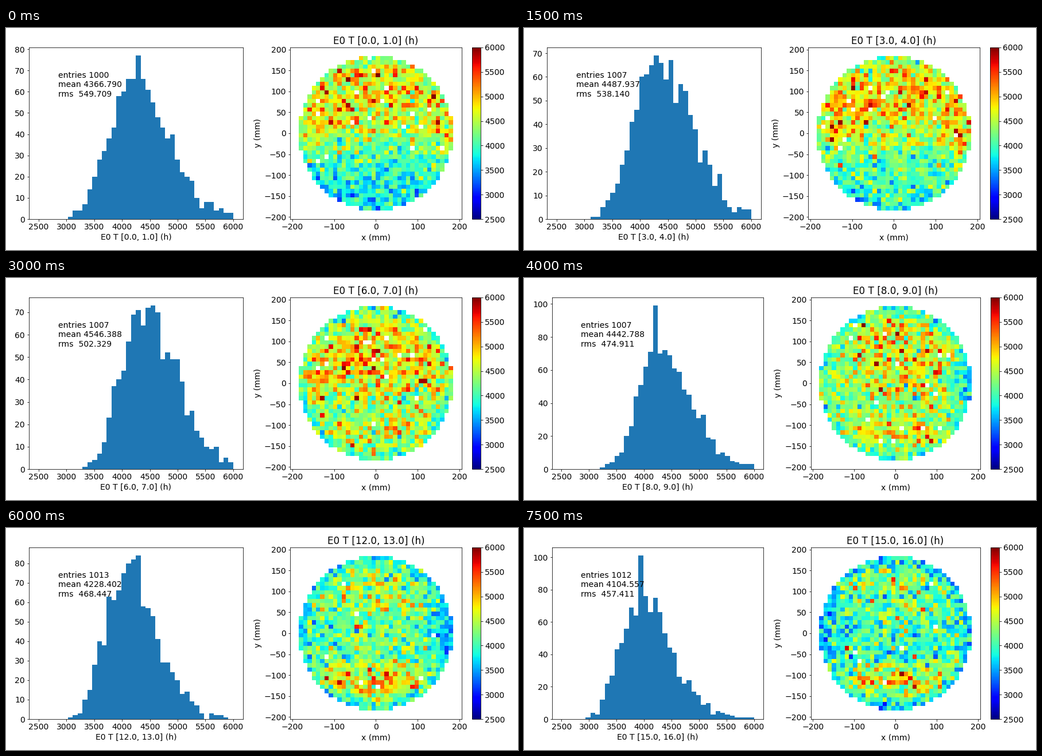
A matplotlib script for the animation above (8 s loop, 892 by 388 pixels).

```python
import numpy as np
import matplotlib.pyplot as plt
from matplotlib.animation import FuncAnimation
from matplotlib.cm import ScalarMappable
from matplotlib.colors import Normalize

W, H, DPI = 892, 388, 64
PX = 72 / DPI  # points per pixel
TOP, BOTTOM = 33.9, 334
LO, HI, BINS = 2500, 6000, 40
STEP = (HI - LO) / BINS
HALF = 205  # half width of the map in mm

plt.rcParams.update({"font.family": "DejaVu Sans", "font.size": 14 * PX,
                     "axes.linewidth": 0.8 * PX, "axes.labelpad": 4 * PX,
                     "axes.titlepad": 6 * PX})
for tick in ("xtick", "ytick"):
    plt.rcParams.update({f"{tick}.major.size": 3.5 * PX, f"{tick}.major.pad": 3.5 * PX,
                         f"{tick}.major.width": 0.8 * PX})

# Statistics at a few hours; the hours between are interpolated.
HOURS = [0, 3, 6, 8, 10, 12, 15]
ENTRIES = [1000, 1007, 1007, 1007, 1005, 1013, 1012]
MEAN = [4366.790, 4487.937, 4546.388, 4442.788, 4318.423, 4228.402, 4104.557]
RMS = [549.709, 538.140, 502.329, 474.911, 464.378, 468.447, 457.411]
PEAK = [77, 69, 73, 99, 87, 84, 101]

# Round detector made of square cells, in units of its radius.
EDGES = np.linspace(-HALF, HALF, BINS + 1)
idx = (np.arange(BINS) - BINS / 2 + 0.5) / 18
U, V = np.meshgrid(idx, idx)
R = np.hypot(U, V)
DISC = R < 1


def stats(hour):
    return [np.interp(hour, HOURS, row) for row in (ENTRIES, MEAN, RMS, PEAK)]


def histogram(hour, rng):
    """Noisy right-skewed (gamma) distribution with a given tallest bar."""
    entries, mean, rms, peak = stats(hour)
    k = 16
    x = LO + STEP * (np.arange(BINS) + 0.5)
    z = np.maximum(k + np.sqrt(k) * (x - mean) / rms, 0.01)
    bars = z ** (k - 1) * np.exp(-z)
    bars *= entries / bars.sum()
    bars = np.maximum(bars + rng.normal(0, 0.7, BINS) * np.sqrt(bars), 0)
    top = bars.argmax()
    bars[top] = 0
    bars = np.minimum(bars * (entries - peak) / bars.sum(), peak)
    bars[top] = peak
    # Round to nearest, but never above the peak.
    return np.minimum(np.round(bars), int(peak)).astype(int)


def blob(u, v, su, sv):
    return np.exp(-((U - u) / su) ** 2 - ((V - v) / sv) ** 2)


def field(hour):
    """Warm upper half fades, a warm band grows below, the sides swing."""
    tilt = 1 / (1 + np.exp(hour - 4))
    rise = np.clip((hour - 3) / 9, 0, 1)
    rise = rise * rise * (3 - 2 * rise)
    centre = np.exp(-((hour - 7) / 2.5) ** 2)
    right = np.cos(2 * np.pi * (hour - 2) / 18)
    left = np.cos(np.pi * (hour - 2) / 13)
    rim = 0.4 + 0.5 * min(hour / 8, 1)
    return (tilt * np.tanh(3 * (V + 0.15))
            + 1.6 * rise * blob(0, -0.62, 0.9, 0.17)
            + 0.5 * blob(0, 0.5, 0.9, 0.3)
            + 0.8 * centre * blob(0, 0.2, 0.6, 0.35)
            + 1.4 * right * blob(0.88, 0, 0.25, 0.4)
            + 0.7 * left * blob(-0.75, 0.12, 0.35, 0.3)
            - rim * np.clip((R - 0.85) / 0.12, 0, 1))


def heatmap(hour, counts, rng):
    """Spread the histogrammed values over the disc, ranked by the field."""
    values = np.repeat(LO + STEP * np.arange(BINS), counts)
    values = np.sort(values + rng.uniform(0, STEP, values.size))
    base = field(hour)[DISC]
    score = base + rng.normal(0, 0.85, base.size)
    # Missing cells are more likely where it is warm.
    filled = np.argsort(0.5 * base + rng.normal(0, 1, base.size))[:values.size]
    filled = filled[np.argsort(score[filled])]
    cells = np.full(base.size, np.nan)
    cells[filled] = values[:filled.size]
    grid = np.full(DISC.shape, np.nan)
    grid[DISC] = cells
    return np.ma.masked_invalid(grid)


def place(ax, x, width):
    ax.set_position([x / W, 1 - BOTTOM / H, width / W, (BOTTOM - TOP) / H])


def layout(wide):
    """Two equal columns; three-digit tick labels narrow both."""
    left, right, gap = (48.6 if wide else 39.8), 868.3, 82.3
    col = (right - left - gap) / 2
    x = left + col + gap
    place(hist_ax, left, col)
    place(map_ax, x, 0.8 * col)
    place(bar_ax, x + 0.85 * col, 15)


fig = plt.figure(figsize=(W / DPI, H / DPI), dpi=DPI, facecolor="white")
hist_ax, map_ax, bar_ax = (fig.add_axes([0, 0, 1, 1], label=n) for n in ("hist", "map", "bar"))
norm = Normalize(LO, HI)
layout(False)
fig.colorbar(ScalarMappable(norm, "jet"), cax=bar_ax)


def draw(hour):
    rng = np.random.default_rng(40 + hour)
    entries, mean, rms, _ = stats(hour)
    counts = histogram(hour, rng)
    peak = counts.max()
    label = f"E0 T [{hour:.1f}, {hour + 1:.1f}] (h)"
    layout(1.05 * peak >= 100)

    hist_ax.cla()
    hist_ax.bar(LO + STEP * np.arange(BINS), counts, STEP, align="edge", color="#1f77b4")
    hist_ax.set(xlim=(LO - 175, HI + 175), ylim=(0, 1.05 * peak), xlabel=label)
    hist_ax.text(LO + 350, 0.75 * peak,
                 f"entries {entries:.0f}\nmean {mean:.3f}\nrms  {rms:.3f}")

    map_ax.cla()
    map_ax.pcolormesh(EDGES, EDGES, heatmap(hour, counts, rng), cmap="jet", norm=norm)
    map_ax.set(xlim=(-HALF, HALF), ylim=(-HALF, HALF),
               xlabel="x (mm)", ylabel="y (mm)", title=label)
    return []


anim = FuncAnimation(fig, draw, frames=16, interval=500, repeat=True, repeat_delay=0)
plt.show()
```
